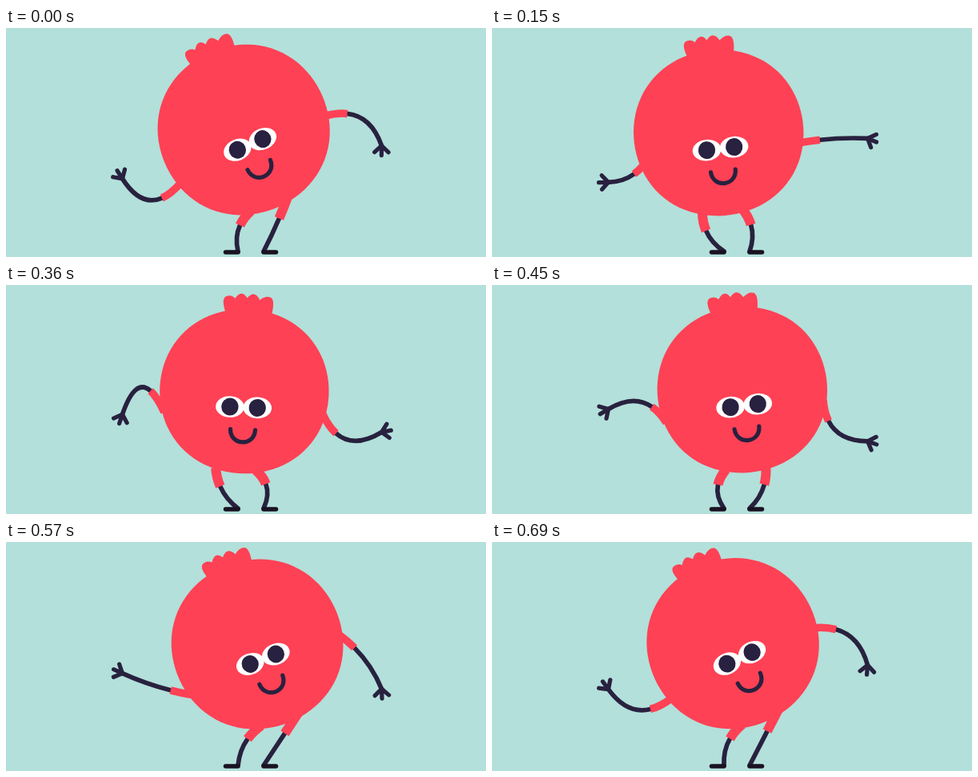
These frames come from a looping animation (600x287 px, 720 ms). An HTML page with a canvas:

```html
<!DOCTYPE html>
<html lang="en">
<head>
<meta charset="utf-8">
<title>Dancing fruit</title>
<style>
  html, body { margin: 0; width: 100%; height: 100%; overflow: hidden; background: #b3e0da; }
  canvas { display: block; width: 600px; height: 287px; }
</style>
</head>
<body>
<canvas id="stage" width="600" height="287"></canvas>
<script>
const ctx = document.getElementById('stage').getContext('2d');
const LOOP = 720, STEP = 30;
const RED = '#ff4155', INK = '#28213f', SHOE = '#191222', SKY = '#b3e0da';
const ARM = 92, LEG = 80;

const rad = deg => deg * Math.PI / 180;
const clamp = v => Math.max(-1, Math.min(1, v));
const mix = (a, b, u) => ({ x: a.x + (b.x - a.x) * u, y: a.y + (b.y - a.y) * u });

// Cosine of the loop phase, peaking at the given angle
const wave = (t, peak, n = 1) => Math.cos(n * 2 * Math.PI * t / LOOP - rad(peak));

// The body sways sideways while it dips and straightens up
function bodyAt(t) {
  const dip = wave(t, 150);
  return {
    x: 299 + 16.1 * wave(t, 263) - 1.5 * wave(t, 0, 2) + 1.6 * wave(t, 0, 3),
    y: 130.4 + 3.3 * dip,
    tilt: rad(-10.6 + 14.8 * dip),
    rx: 106.4 - 0.8 * dip,
    ry: 104.5 - 1.7 * dip
  };
}

// Stage position of a point fixed to the body
function joint(b, x, y) {
  const c = Math.cos(b.tilt), s = Math.sin(b.tilt);
  return { x: b.x + x * c - y * s, y: b.y + x * s + y * c };
}

function stroke(color, width, cap, trace) {
  ctx.strokeStyle = color;
  ctx.lineWidth = width;
  ctx.lineCap = cap;
  ctx.lineJoin = 'round';
  ctx.beginPath();
  trace();
  ctx.stroke();
}

function oval(x, y, rx, ry, color) {
  ctx.fillStyle = color;
  ctx.beginPath();
  ctx.ellipse(x, y, rx, ry, 0, 0, 2 * Math.PI);
  ctx.fill();
}

const reach = (a, b) => Math.hypot(b.x - a.x, b.y - a.y);

// Bowed limb whose first part is a red sleeve; returns the bow's control point
function limb(from, to, bulge, cuff, width) {
  const k = 2 * bulge / reach(from, to), mid = mix(from, to, 0.5);
  const bow = {
    x: mid.x + k * (to.y - from.y),
    y: mid.y - k * (to.x - from.x)
  };
  const a = mix(from, bow, cuff), b = mix(bow, to, cuff), end = mix(a, b, cuff);
  stroke(INK, 5.7, 'round', () => {
    ctx.moveTo(end.x, end.y);
    ctx.quadraticCurveTo(b.x, b.y, to.x, to.y);
  });
  stroke(RED, width, 'butt', () => {
    ctx.moveTo(from.x, from.y);
    ctx.quadraticCurveTo(a.x, a.y, end.x, end.y);
  });
  return bow;
}

// The arm keeps its length, so it bows more as the hand comes closer
function arm(shoulder, wrist, bend, twist) {
  const slack = Math.max(0, ARM ** 2 - reach(shoulder, wrist) ** 2);
  const bow = limb(shoulder, wrist, 0.433 * Math.sqrt(slack) * bend, 0.3, 9.5);
  const angle = Math.atan2(wrist.y - bow.y, wrist.x - bow.x) + rad(twist);
  stroke(INK, 5.2, 'round', () => {
    for (const spread of [-47, 0, 47]) {
      const a = angle + rad(spread);
      ctx.moveTo(wrist.x, wrist.y);
      ctx.lineTo(wrist.x + 12 * Math.cos(a), wrist.y + 12 * Math.sin(a));
    }
  });
}

function leg(hip, ankleX, side) {
  const ankle = { x: ankleX, y: 280 };
  limb(hip, ankle, side * 0.3 * Math.max(0, LEG - reach(hip, ankle)), 0.4, 12);
  stroke(SHOE, 5.5, 'round', () => {
    ctx.moveTo(ankleX, 281);
    ctx.lineTo(ankleX + side * 15.5, 281);
  });
}

function crown() {
  ctx.beginPath();
  ctx.moveTo(-28, -84);
  ctx.lineTo(-28, -100);
  ctx.quadraticCurveTo(-34, -118, -25, -119);
  ctx.quadraticCurveTo(-20, -120, -16, -116);
  ctx.quadraticCurveTo(-8, -128, -1, -117);
  ctx.quadraticCurveTo(8, -128, 15, -115);
  ctx.quadraticCurveTo(22, -121, 28, -119);
  ctx.quadraticCurveTo(34, -117, 31, -100);
  ctx.lineTo(31, -84);
  ctx.fill();
}

function head({ x, y, tilt, rx, ry }) {
  ctx.save();
  ctx.translate(x, y);
  ctx.rotate(tilt);
  ctx.fillStyle = RED;
  ctx.beginPath();
  for (let d = 0; d < 360; d += 4) {
    const a = rad(d), r = 1 + 0.006 * (1 - Math.cos(4 * a));
    ctx.lineTo(rx * r * Math.cos(a), ry * r * Math.sin(a));
  }
  ctx.fill();
  crown();
  for (const side of [-17.2, 17.2]) oval(side, 20, 17.8, 13.3, '#fff');
  for (const side of [-17.2, 17.2]) oval(side, 20, 10.6, 11, INK);
  stroke(INK, 5.2, 'round', () => {
    ctx.moveTo(-15.5, 48);
    ctx.bezierCurveTo(-15, 69, 15, 69, 15.5, 48);
  });
  ctx.restore();
}

function draw(now) {
  const t = Math.floor(now % LOOP / STEP) * STEP;
  const b = bodyAt(t);
  const bend = clamp(1.3 * wave(t, -8));
  ctx.fillStyle = SKY;
  ctx.fillRect(0, 0, 600, 287);
  leg(joint(b, -32, 97), 290, -1);
  leg(joint(b, 18, 98), 322, 1);
  arm(joint(b, -99, 30), { x: 145.5, y: 175.5 + 20 * wave(t, 48) }, bend, 0);
  arm(joint(b, 99, 24.5), { x: 469.5, y: 166 + 30 * wave(t, 232) }, bend, 20);
  head(b);
}

function tick() {
  draw(performance.now());
  requestAnimationFrame(tick);
}
tick();
</script>
</body>
</html>
```
